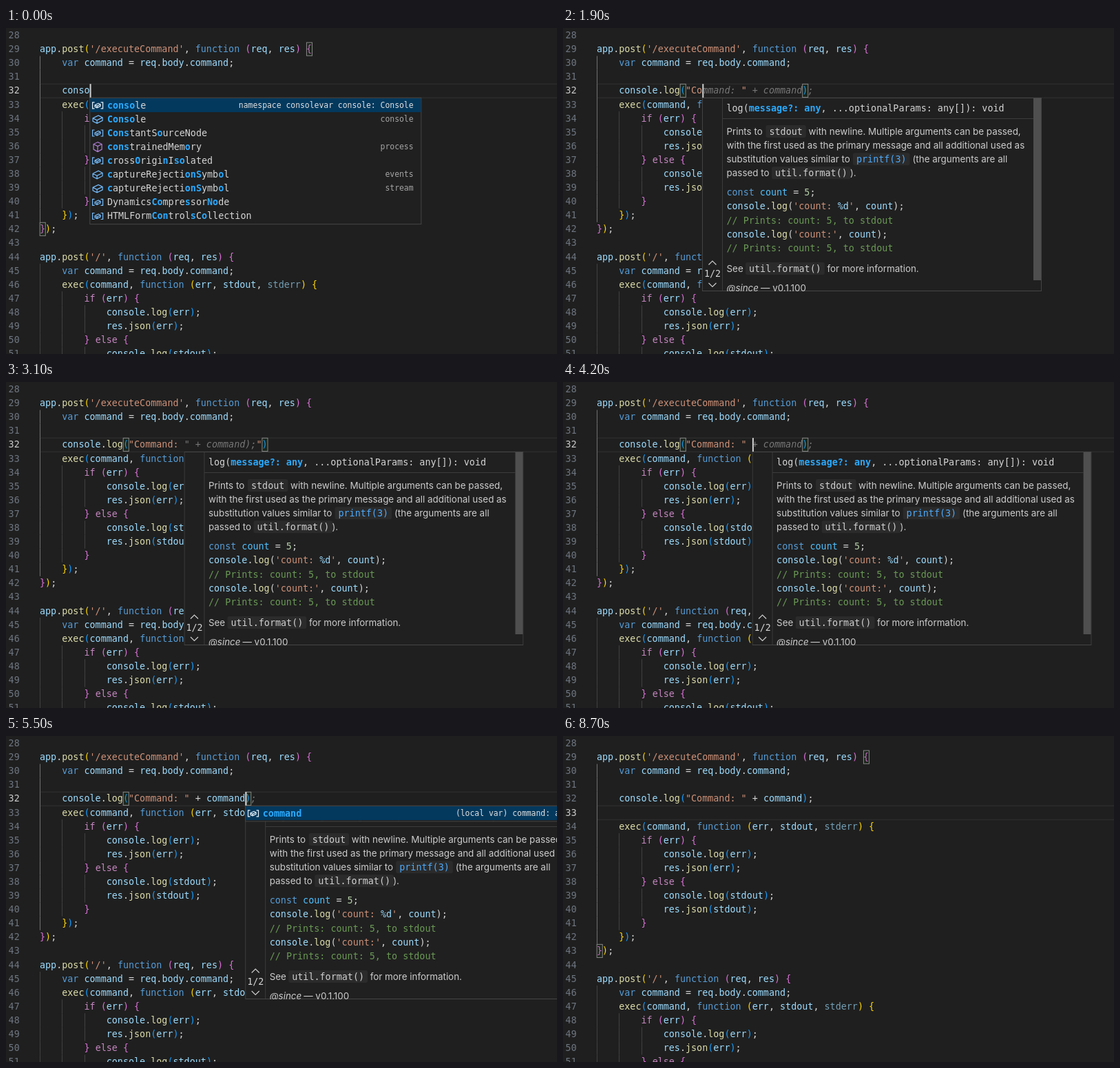
An HTML page that plays this animation: 800 px wide and 473 px high, repeating every 8800 ms.

```html
<!DOCTYPE html>
<html lang="en">
<head>
<meta charset="utf-8">
<title>Editor typing</title>
<style>
html, body { margin: 0; width: 100%; height: 100%; overflow: hidden; background: #1f1f1f; }
svg { display: block; }
text { font: 13.4px "DejaVu Sans Mono", monospace; fill: #d4d4d4; white-space: pre; }
.sans { font-family: Inter, sans-serif; fill: #ccc; }
.small { font-size: 11.4px; fill: #a5a5a5; }
.b { font-weight: bold; fill: #2aaaff; }
.i { font-style: italic; }
.ghost { font-style: italic; fill: #777; }
</style>
</head>
<body>
<svg id="stage" width="800" height="473" viewBox="0 0 800 473" xml:space="preserve"></svg>
<script>
const LOOP = 8800, STEP = 100;
const LEFT = 49, CW = 8.0675, LH = 20.09, FIRST = 28, TOP = 0.4;
const COLORS = {
  key: '#569cd6', flow: '#c586c0', fn: '#dcdcaa', name: '#9cdcfe', str: '#ce9178',
  num: '#b5cea8', note: '#6a9955', fixed: '#4fc1ff', unused: '#739fb5', plain: '#d4d4d4'
};
const PAIRS = ['#ffd700', '#da70d6', '#179fff'];

const TYPED = 'console.log("Command: " + command);';
// Moment at which each character from the sixth on is typed.
const KEYS = [200, 300, 500, 700, 800, 900, 1100, 1400, 1700, 1900, 2000, 2100, 2300, 2400, 2500,
  2600, 2800, 3500, 3800, 4300, 4400, 4600, 4700, 4800, 4900, 5000, 5200, 5300, 5700, 6100];
const ENTER = 7600;
const CARET_OFF = [[3000, 3500], [7400, 7600], [8100, 8500], [8700, 8800]];

const handler = [
  '    exec(command, function (err, stdout, stderr) {',
  '        if (err) {',
  '            console.log(err);',
  '            res.json(err);',
  '        } else {',
  '            console.log(stdout);',
  '            res.json(stdout);',
  '        }',
  '    });',
  '});'
];
const body = '    var command = req.body.command;';
const head = ['', "app.post('/executeCommand', function (req, res) {", body, ''];
const tail = [...handler, '', "app.post('/', function (req, res) {", body, ...handler];

// Completion rows: icon, label with *matched* parts, detail.
const CONSO = [
  ['v', '*conso*le', 'namespace consolevar console: Console'],
  ['f', '*Conso*le', 'console'],
  ['v', '*Cons*tantS*o*urceNode'],
  ['m', '*cons*trainedMem*o*ry', 'process'],
  ['v', '*c*ross*O*rigi*n*I*so*lated'],
  ['f', '*c*aptureRejecti*onS*ymb*o*l', 'events'],
  ['f', '*c*aptureRejecti*onS*ymb*o*l', 'stream'],
  ['v', 'Dynamics*Co*mpre*s*sor*No*de'],
  ['v', 'HTMLForm*Con*trol*s*C*o*llection']
];
const CONSOL = [
  ['v', '*consol*e', CONSO[0][2]],
  ['f', '*Consol*e', 'console'],
  ['v', '*c*ross*O*rigi*n*I*sol*ated'],
  ['f', '*c*aptureRejecti*onS*ymb*ol*', 'events'],
  ['f', '*c*aptureRejecti*onS*ymb*ol*', 'stream'],
  ['v', 'HTMLForm*Con*trol*s*C*ol*lection']
];
const CONSOLE = [['v', '*console*', CONSO[0][2]], ['f', '*Console*', 'console']];
const METHODS = 'assert clear count countReset debug dir dirxml error group groupCollapsed groupEnd info'
  .split(' ').map((s, i) => ['m', s, i ? '' : '(method) Console.assert(): void']);
const LOG = '(method) Console.log(): void';
const ARG = '(local var) command: any';

function suggestions(n) {
  if (n < 12) {
    return {
      5: CONSO, 6: CONSOL, 7: CONSOLE, 8: METHODS,
      9: [['m', '*l*og', LOG], ['m', 'c*l*ear'], ['m', 'time*L*og'], ['m', 'dirxm*l*'], ['m', 'tab*l*e']],
      10: [['m', '*lo*g', LOG], ['m', 'time*Lo*g']],
      11: [['m', '*log*', LOG], ['m', 'time*Log*']]
    }[n];
  }
  if (n < 27 || n > 33) return null;
  const k = n - 26;
  const mark = s => `*${s.slice(0, k)}*${s.slice(k)}`;
  const more = { 1: ['console', 'clearTimeout', 'confirm'], 2: ['console', 'confirm'], 3: ['Comment'], 4: ['Comment'] }[k] || [];
  return [['v', mark('command'), ARG], ...more.map(s => ['v', mark(s)])];
}

const esc = s => s.replace(/&/g, '&amp;').replace(/</g, '&lt;');
const span = (s, fill) => `<tspan fill="${fill}">${esc(s)}</tspan>`;
const text = (x, y, inner, cls = '', extra = '') => `<text x="${x}" y="${y}" class="${cls}" ${extra}>${inner}</text>`;
const rect = (x, y, w, h, fill, extra = '') => `<rect x="${x}" y="${y}" width="${w}" height="${h}" fill="${fill}" ${extra}/>`;
const path = (d, stroke, w = 1, extra = '') =>
  `<path d="${d}" fill="none" stroke="${stroke}" stroke-width="${w}" ${extra}/>`;
const colX = c => LEFT + c * CW;
const rowY = line => TOP + (line - FIRST) * LH;

// Colours code; pairs.depth, if given, carries bracket nesting across calls.
function paint(code, pairs) {
  let last = '', out = '';
  const tokens = code.match(/'[^']*'|"[^"]*"?|\/\/.*|\w+|\s+|./g) || [];
  tokens.forEach((s, i) => {
    let c = COLORS.plain;
    if (/^['"]/.test(s)) c = COLORS.str;
    else if (s.startsWith('//')) c = COLORS.note;
    else if (/^\d/.test(s)) c = COLORS.num;
    else if (/^(var|function|const)$/.test(s)) c = COLORS.key;
    else if (/^(if|else)$/.test(s)) c = COLORS.flow;
    else if (s === 'stderr') c = COLORS.unused;
    else if (/^\w/.test(s)) c = tokens[i + 1] === '(' ? COLORS.fn : last === 'const' ? COLORS.fixed : COLORS.name;
    else if (pairs && /[({]/.test(s)) c = PAIRS[pairs.depth++ % 3];
    else if (pairs && /[)}]/.test(s)) c = PAIRS[--pairs.depth % 3];
    if (/\w/.test(s)) last = s;
    out += s.includes('%d') ? s.split('%d').map(p => span(p, c)).join(span('%d', COLORS.name)) : span(s, c);
  });
  return out;
}

// The line being typed, as [text, isGhost] parts.
function typedParts(n, t) {
  const real = '    ' + TYPED.slice(0, n);
  if (n < 12 || n === 35) return [[real]];
  if (n === 12) return [[real], [')']];
  if (n === 34) return [[real], [';', 1]];
  if (n === 13 && t < 1600) return [[real], ['"'], [')']];
  if (n === 22) return [[real], [TYPED.slice(22), 1], ['"'], [')']];
  if (n < 22) return [[real], [TYPED.slice(n, 22), 1], ['"'], [TYPED.slice(23, 33), 1], [')'], [';', 1]];
  return [[real], [TYPED.slice(n, 33), 1], [')'], [';', 1]];
}

const box = (line, col) =>
  rect(colX(col) + .2, rowY(line) + .6, CW, LH - 1, 'rgba(0,100,0,.1)', 'stroke="#888"');

function drawCode(t, n) {
  const entered = t >= ENTER, active = entered ? 33 : 32;
  const lines = [...head, null, ...(entered ? [''] : []), ...tail].slice(0, 24);
  const pairs = { depth: 0 };
  let out = rect(LEFT + .5, rowY(active) + .5, 760, LH, 'none', 'stroke="#2b2b2b" stroke-width="1.5"');
  lines.forEach((code, i) => {
    const line = FIRST + i, y = rowY(line), base = y + 14.7;
    const indent = code === null ? 4 : code === '' ? (pairs.depth ? 4 : 0) : code.search(/\S/);
    for (let c = 0; c < indent; c += 4) {
      const bright = c === 0 && line < 43;
      out += rect(Math.round(colX(c)), y, 1, LH + .1, bright ? '#707070' : '#404040');
    }
    out += text(3.6, base, line, '', `style="fill:${line === active ? '#ccc' : '#6e7681'}"`);
    const inner = code === null
      ? typedParts(n, t).map(([s, g]) => g ? `<tspan class="ghost">${s}</tspan>` : paint(s, pairs)).join('')
      : paint(code, pairs);
    out += text(LEFT, base, inner);
  });
  if (n >= 12 && n < 35) {
    out += box(32, 15) + box(32, n === 22 ? 40 : n === 12 ? 16 : n === 13 && t < 1600 ? 18 : 37);
  } else {
    out += box(29, 48) + box(entered ? 43 : 42, 0);
  }
  if (!CARET_OFF.some(([a, b]) => t >= a && t < b)) {
    out += rect(colX(entered ? 4 : n + 4), rowY(active) + .4, 2, LH, '#d0d0d0');
  }
  return out;
}

const ICONS = {
  v: ['M-4.5-4.5H-7.5V4.5H-4.5M4.5-4.5H7.5V4.5H4.5M-4-.5L1-3 4-1.5V1L-1 3.5-4 2ZM-4-.5L-1 1 4-1.5M-1 1V3.5', '#75beff'],
  f: ['M-7-1.5L1-5.5 7-2.5V2L-1 6-7 3ZM-7-1.5L-1 1.5 7-2.5M-1 1.5V6', '#75beff'],
  m: ['M0-7L6-4V3.5L0 7-6 3.5V-4ZM-6-4L0-1 6-4M0-1V7', '#b180d7']
};

function drawSuggest(x, rows) {
  const h = rows.length * LH + 2.5;
  let out = rect(x + .2, 101.3, 481, h, '#202020', 'stroke="#454545"');
  rows.forEach(([icon, label, detail], i) => {
    const mid = 112 + i * LH, [d, color] = ICONS[icon];
    if (!i) out += rect(x + .7, 102, 480, LH, '#04395e');
    out += path(d, i ? color : '#e8f2fa', 1.2, `transform="translate(${x + 11.5} ${mid + .3})"`);
    const name = label.split('*').map((s, k) => k % 2 ? `<tspan class="b">${s}</tspan>` : s).join('');
    out += text(x + 25.3, mid + 4.5, name);
    if (detail) {
      out += text(x + 470, mid + 3.8, esc(detail), 'small', `text-anchor="end"${i ? '' : ' style="fill:#e0e0e0"'}`);
    }
  });
  return out;
}

const SNIPPET = ['const count = 5;', "console.log('count: %d', count);", '// Prints: count: 5, to stdout',
  "console.log('count:', count);", '// Prints: count: 5, to stdout'];

function drawHint(x) {
  const L = 35.5;
  const say = (dx, y, s, cls = '') => text(dx, y, s, 'sans ' + cls);
  const chip = (dx, y, s, fill = '#d0d0d0') =>
    rect(dx - 5, y - 13.5, s.length * CW + 10, 18, '#2b2b2b', 'rx="3"') + text(dx, y, s, '', `style="fill:${fill}"`);
  return `<svg x="${x - .3}" y="101" width="493" height="281" viewBox="0 101 493 281">` +
    rect(.5, 101.5, 492, 280, '#202020', 'stroke="#454545"') +
    path('M29.5 102V381M29.5 131.5H481', '#3c3c3c') +
    rect(481, 102, 11, 264, '#4f4f4f') +
    path('M9.5 343.5L15 338 20.5 343.5M9.5 370L15 375.5 20.5 370', '#ccc', 1.2) +
    text(3, 361, '1/2') +
    text(L, 120.6, 'log(<tspan class="b">message?: any</tspan>, ...optionalParams: any[]): void') +
    say(L, 154.5, 'Prints to') + chip(97.5, 154.5, 'stdout') +
    say(154.5, 154.5, 'with newline. Multiple arguments can be passed,') +
    say(L, 174.6, 'with the first used as the primary message and all additional used as') +
    say(L, 194.7, 'substitution values similar to') + chip(224, 194.7, 'printf(3)', '#4daafc') +
    say(305.5, 194.7, '(the arguments are all') +
    say(L, 214.8, 'passed to') + chip(106, 214.8, 'util.format()') + say(215, 214.8, ').') +
    SNIPPET.map((s, i) => text(L, 243.4 + i * LH, paint(s))).join('') +
    say(L, 353.5, 'See') + chip(68, 353.5, 'util.format()') + say(181.5, 353.5, 'for more information.') +
    say(L, 382, '@since', 'i') + say(85, 382, '— v0.1.100') +
    '</svg>';
}

function drawPointer(t) {
  if (t < 6500 || t >= ENTER) return '';
  const u = 1 - (1 - Math.min(1, (t - 6500) / 600)) ** 2, v = 1 - u;
  const x = 296 * v * v + 840 * u * v + 392 * u * u;
  const y = 190 * v * v + 300 * u * v + 97 * u * u;
  const d = 'M-3.5-6Q0-6 0-4Q0-6 3.5-6M0-4V4M-3.5 6Q0 6 0 4Q0 6 3.5 6M-1.5 2H1.5';
  const at = `transform="translate(${x} ${y})"`;
  return path(d, '#e8e8e8', 2.8, at) + path(d, '#111', 1, at);
}

function render(t) {
  const n = 5 + KEYS.filter(k => k <= t).length;
  const x = colX(n + 4), rows = suggestions(n);
  let out = drawCode(t, n);
  if (n >= 12 && n < 34) out += drawHint(x);
  if (rows) out += drawSuggest(x, rows);
  return out + drawPointer(t);
}

const stage = document.getElementById('stage');
const start = performance.now();
let shown = -1;
function tick() {
  const now = Math.max(0, performance.now() - start) % LOOP;
  const t = Math.floor(now / STEP) * STEP;
  if (t !== shown) stage.innerHTML = render(shown = t);
  requestAnimationFrame(tick);
}
tick();
</script>
</body>
</html>
```
